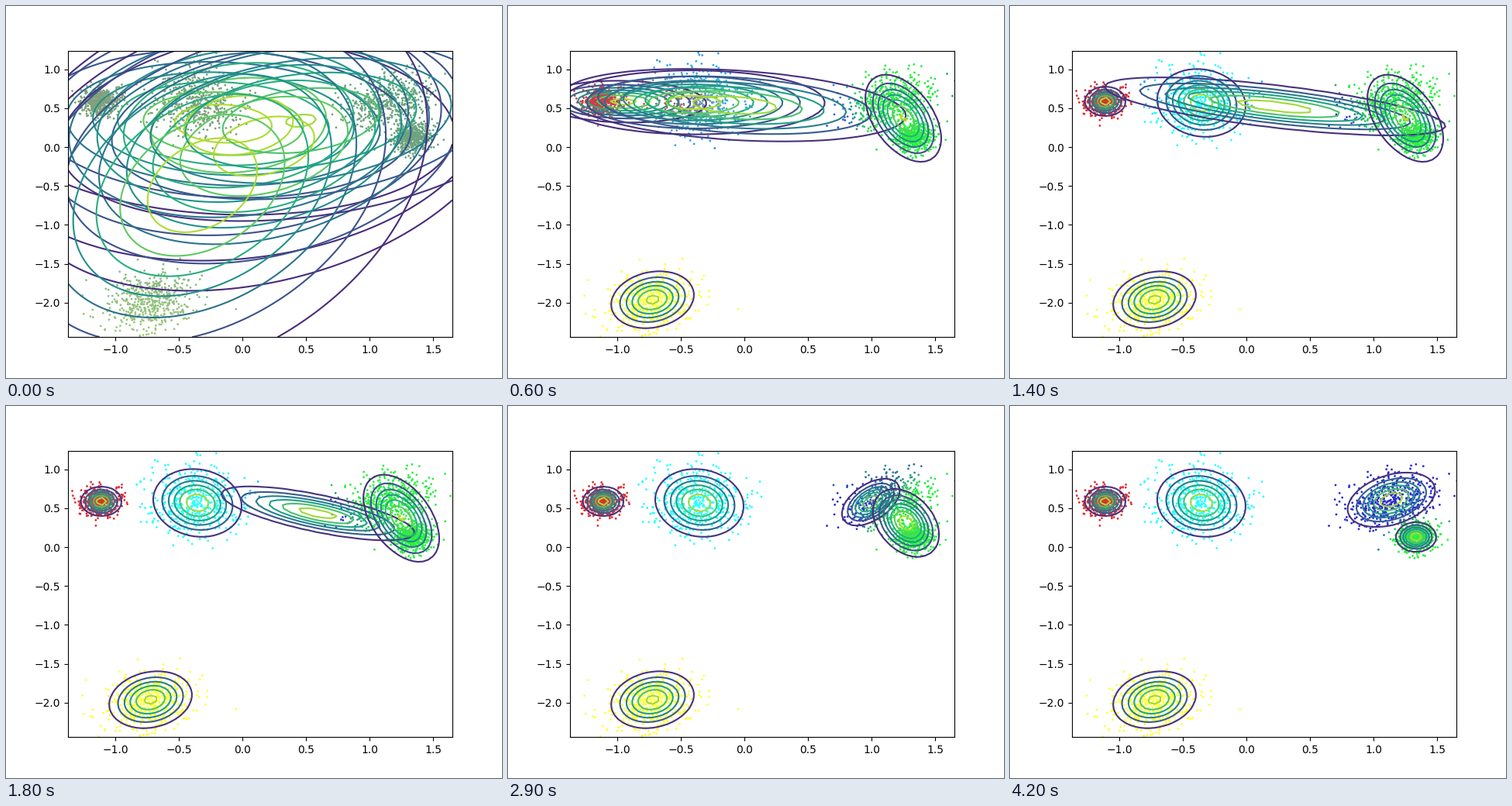
Animation, 640 px wide and 480 px high, one loop 4.3 s. Source, as a matplotlib script:

```python
import numpy as np
import matplotlib.pyplot as plt
from matplotlib.animation import FuncAnimation

FRAMES, INTERVAL = 43, 100
XLIM, YLIM = (-1.372, 1.652), (-2.44, 1.238)
NAMES = ["red", "cyan", "blue", "green", "yellow"]
COLORS = np.array([[0.88, 0.18, 0.20], [0.16, 1, 1], [0.17, 0.17, 0.82],
                   [0.17, 0.94, 0.25], [1, 1, 0.20]])

# Every Gaussian: mean x, mean y, sd x, sd y, correlation
HOME = {
    "red": (-1.11, 0.587, 0.081, 0.096, 0),
    "cyan": (-0.354, 0.567, 0.177, 0.222, -0.1),
    "blue": (1.14, 0.607, 0.175, 0.178, 0.35),
    "green": (1.335, 0.129, 0.079, 0.096, 0),
    "yellow": (-0.7225, -1.96, 0.169, 0.190, 0.17),
}
START = {
    "red": (-0.15, 0.30, 0.90, 0.58, -0.1),
    "cyan": (-0.03, 0.28, 0.97, 0.86, 0.15),
    "blue": (0.17, 0.01, 0.95, 0.92, 0.30),
    "green": (0.46, 0.34, 1.00, 0.68, 0.25),
    "yellow": (-0.315, -0.49, 0.87, 1.22, 0.32),
}
# Green first covers both right-hand clusters
WIDE = (1.25, 0.37, 0.15, 0.282, -0.47)


def mix(**shares):
    """Gaussian with the moments of a mixture of home clusters."""
    w = np.array(list(shares.values()))
    mx, my, sx, sy, rho = np.array([HOME[name] for name in shares]).T
    cx, cy = w @ mx, w @ my
    vx = w @ (sx ** 2 + (mx - cx) ** 2)
    vy = w @ (sy ** 2 + (my - cy) ** 2)
    cov = w @ (rho * sx * sy + (mx - cx) * (my - cy))
    return cx, cy, np.sqrt(vx), np.sqrt(vy), cov / np.sqrt(vx * vy)


# Stops between start and home, as step: Gaussian
STOPS = {
    "red": {6: mix(red=0.79, cyan=0.21), 11: HOME["red"]},
    "cyan": {6: mix(cyan=0.76, red=0.18, blue=0.06), 14: HOME["cyan"]},
    "blue": {
        6: mix(cyan=0.75, blue=0.12, green=0.08, red=0.05),
        14: (0.226, 0.522, 0.69, 0.191, -0.68),
        22: (0.963, 0.343, 0.224, 0.167, -0.75),
        29: (0.994, 0.577, 0.1145, 0.1515, 0.50),
        36: HOME["blue"],
    },
    "green": {6: WIDE, 26: WIDE, 38: HOME["green"]},
    "yellow": {4: HOME["yellow"]},
}


def gaussian(name, step):
    """Glide between stops; spreads shrink and grow geometrically."""
    stops = {0: START[name], **STOPS[name]}
    mx, my, sx, sy, rho = np.array(list(stops.values())).T
    rows = (mx, my, np.log(sx), np.log(sy), rho)
    mx, my, lx, ly, rho = (np.interp(step, list(stops), r) for r in rows)
    return mx, my, np.exp(lx), np.exp(ly), rho


def density(x, y, mx, my, sx, sy, rho):
    u, v, q = (x - mx) / sx, (y - my) / sy, 1 - rho ** 2
    norm = 2 * np.pi * sx * sy * np.sqrt(q)
    # The floor keeps far regions from underflowing to a zero contour
    return np.exp(-(u * u - 2 * rho * u * v + v * v) / (2 * q)) / norm + 1e-12


def make_points(n=500):
    rng = np.random.default_rng(7)
    parts = []
    for mx, my, sx, sy, rho in HOME.values():
        cov = [[sx * sx, rho * sx * sy], [rho * sx * sy, sy * sy]]
        parts.append(rng.multivariate_normal((mx, my), cov, n))
    return np.vstack(parts)


def blend(comps, step):
    """Colour every point by its share in each component, soft at first."""
    like = np.array([density(*points.T, *c) for c in comps]).T
    like **= min(1, 0.4 + 0.1 * step)
    weights = np.full(len(comps), 1 / len(comps))
    for _ in range(6):
        share = like * weights
        share /= share.sum(axis=1, keepdims=True)
        if step:
            weights = share.mean(axis=0)
    return np.clip(share @ COLORS, 0, 1)


points = make_points()
gx, gy = np.meshgrid(np.linspace(*XLIM, 80), np.linspace(*YLIM, 80))

fig, ax = plt.subplots(figsize=(6.4, 4.8), dpi=100)
ax.set_xlim(*XLIM)
ax.set_ylim(*YLIM)
dots = ax.scatter(*points.T, s=1, c=np.zeros((len(points), 3)))
rings = []


def update(step):
    while rings:
        rings.pop().remove()
    comps = [gaussian(name, step) for name in NAMES]
    colors = blend(comps, step)
    dots.set_facecolor(colors)
    dots.set_edgecolor(colors)
    for c in comps:
        rings.append(ax.contour(gx, gy, density(gx, gy, *c)))
    return [dots]


anim = FuncAnimation(fig, update, frames=FRAMES, interval=INTERVAL,
                     init_func=lambda: [dots], repeat=True, repeat_delay=0)
plt.show()
```
